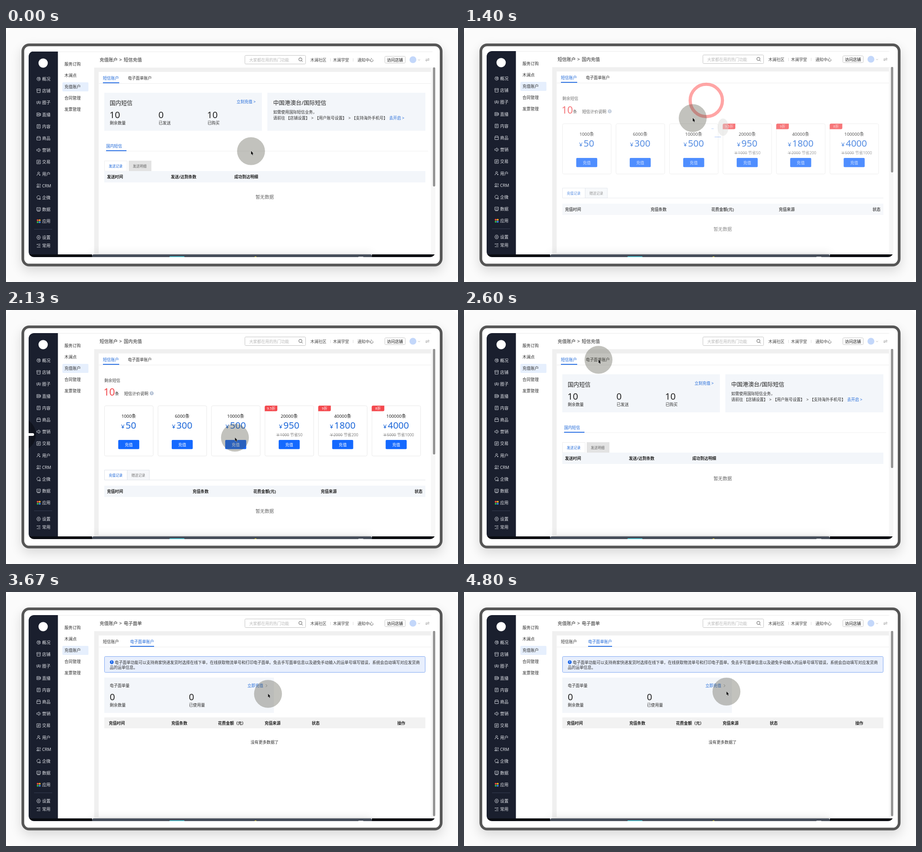
An HTML page with a canvas for the animation above (4.87 s loop, 998 by 561 pixels).

```html
<!DOCTYPE html>
<html lang="zh-CN">
<head>
<meta charset="utf-8">
<style>
html, body { margin: 0; width: 100%; height: 100%; overflow: hidden; background: #fff; }
canvas { display: block; width: 998px; height: 561px; }
</style>
</head>
<body>
<canvas id="stage" width="998" height="561"></canvas>
<script>
const c = document.getElementById('stage').getContext('2d');
const LOOP = 4870, STEP = 1000 / 15;
const FONT = '"Noto Sans", "Noto Sans CJK SC", "Noto Sans CJK", sans-serif';
const BLUE = '#1b66d8', INK = '#2e2e2e', PALE = '#f3f6fa';

const clamp = v => Math.max(0, Math.min(1, v));
const progress = (t, from, to) => clamp((t - from) / (to - from));
const smooth = p => p * p * (3 - 2 * p);

function text(s, x, y, size = 8.75, color = INK, weight = 400, align = 'left') {
  c.font = `${weight} ${size}px ${FONT}`;
  c.fillStyle = color;
  c.textAlign = align;
  c.fillText(s, x, y + size * 0.37);
}

function box(x, y, x2, y2, fill, border, r = 0) {
  c.beginPath();
  c.roundRect(x, y, x2 - x, y2 - y, r);
  if (fill) { c.fillStyle = fill; c.fill(); }
  if (border) { c.strokeStyle = border; c.lineWidth = 1; c.stroke(); }
}

function dot(x, y, r, fill) {
  c.beginPath();
  c.arc(x, y, r, 0, 7);
  c.fillStyle = fill;
  c.fill();
}

function icon(path, x, y, color, width = 0.9) {
  c.save();
  c.translate(x, y);
  c.strokeStyle = color;
  c.lineWidth = width;
  c.stroke(new Path2D(path));
  c.restore();
}

const row = (items, y, size, color, weight) =>
  items.forEach(([s, x]) => text(s, x, y, size, color, weight));

const MENU = [
  ['概况', 'M-1-4A4 4 0 1 0 4 1H-1ZM1-4A4 4 0 0 1 4-1H1Z'],
  ['店铺', 'M-4-4H4V-1H-4ZM-3.5-1V4H3.5V-1'],
  ['圈子', 'M-1.5-2a1.5 1.5 0 1 0 3 0a1.5 1.5 0 1 0-3 0M-2.5 3.5a2.5 3 0 0 1 5 0M-3-3A1.5 1.5 0 0 0-3 0L-4.5 2.5M3-3A1.5 1.5 0 0 1 3 0L4.5 2.5'],
  ['直播', 'M-4-3.5H2V3.5H-4ZM2-1L4.5-2.5V2.5L2 1M-2-1.5L.5 0L-2 1.5Z'],
  ['内容', 'M-3.5-4H3.5V4H-3.5ZM-1.5-2H1.5M-1.5 0H1.5M-1.5 2H.5'],
  ['商品', 'M-3-4H3L4-1V4H-4V-1ZM-4-1H4'],
  ['营销', 'M-4-1.5H-2L1-4V4L-2 1.5H-4ZM3-2.5A4 4 0 0 1 3 2.5'],
  ['交易', 'M-4-4H4V4H-4ZM-2-1H2L.5-2.5M2 1H-2L-.5 2.5'],
  ['用户', 'M-2-2a2 2 0 1 0 4 0a2 2 0 1 0-4 0M-4 4A4 4 0 0 1 0 .5M1 2.5H4M2.5 1V4'],
  ['CRM', 'M-3.5-2a2 2 0 1 0 4 0a2 2 0 1 0-4 0M-4 3.5V2H1V3.5ZM2-4A2 2 0 0 1 2 0M3 1.5L4 3.5H2.5'],
  ['企微', 'M1 3A3.7 3.7 0 1 1 3.5 0M-2 3V4.5M1 1.5H4V4H1Z'],
  ['数据', 'M-4-4H4V2.5H-4ZM-3 4H3M-2.5 0L-.5-1.5L1 0L3-2'],
  ['应用', ''],
  ['设置', 'M-2-4H2L4.3 0L2 4H-2L-4.3 0ZM-1.5 0a1.5 1.5 0 1 0 3 0a1.5 1.5 0 1 0-3 0'],
  ['常用', 'M-1-3H4M-1 0H4M-4 3.5H4M-4-1.5L-2.8-3.5L-1.8-1.5']
];

function sidebar() {
  box(50, 51, 114.6, 501, '#1a1f2e');
  dot(82, 76.5, 10.3, '#fff');
  MENU.forEach(([label, path], i) => {
    const y = i < 13 ? 111.5 + i * 26.2 : 461.5 + (i - 13) * 18;
    text(label, 79.7, y, 9.2, '#e4e6eb');
    icon(path, 72, y, '#d5d8df');
  });
  ['#f04b43', '#f9b51c', '#35b34a', '#3b82f6'].forEach((color, i) =>
    dot(70 + (i % 2) * 4.4, 423.5 + (i >> 1) * 4.4, 2.1, color));
  box(62, 443, 102, 444, '#343b50');
  box(124.5, 119, 182, 139, '#e6effd', null, 2);
  ['服务订购', '木澜点', '充值账户', '合同管理', '发票管理'].forEach((s, i) =>
    text(s, 129, 79 + i * 25, 9));
}

function header(page) {
  row([[page.crumb[0], 206.7], ['>', 250], [page.crumb[1], 260]], 69.5, 10, '#222', 500);
  box(527.5, 59.5, 661.5, 78.5, '#fff', '#c4c4c4', 2);
  text('大家都在用的热门功能', 537, 69.5, 8.8, '#b9b9b9');
  icon('M-4-.7a3.5 3.5 0 1 0 7 0a3.5 3.5 0 1 0-7 0M2 2L4.5 4.5', 650.5, 69, '#555', 1);
  row([['木澜社区', 672], ['木澜学堂', 722], ['通知中心', 776]], 69.5, 8.9, '#444');
  box(716, 66, 716.7, 73, '#ccc');
  box(766, 66, 766.7, 73, '#ccc');
  box(836.5, 61.5, 881.5, 76.5, '#fff', '#c8c8c8', 2);
  text('访问店铺', 841, 69.5, 8.9, '#111', 500);
  dot(898.5, 69, 7.6, '#c3d7fa');
  icon('M-2-1L0 1L2-1', 912, 69.5, '#aaa');
  icon('M-4-1H4L1.5-3.5M4 1.5H-4L-1.5 4', 930.5, 69, '#888', 0.8);

  box(194.6, 86.6, 948, 500, '#f0f0f0');
  box(204.6, 96, 938, 497, '#fff');
  box(205, 121, 938, 122, '#ededed');
  box(938, 87, 948, 500, '#f7f7f7');
  box(942.7, 86, 947.7, page.thumb, '#929292', null, 2);
  const bill = page === PAGES.bill;
  text('短信账户', 214, 109.5, 8.85, bill ? INK : BLUE, bill ? 400 : 500);
  text('电子面单账户', bill ? 274 : 269, 109.5, 8.8, bill ? BLUE : INK, bill ? 500 : 400);
  box(bill ? 274 : 214, 119, bill ? 327 : 250, 121, '#2f74e6');
}

function smsPage() {
  box(217, 142, 565, 226, PALE);
  box(577, 142, 926, 226, PALE);
  text('国内短信', 229, 164, 12.6, '#222');
  text('立刻充值 >', 509, 161.5, 8.75, BLUE);
  row([['10', 228.5], ['0', 336.5], ['10', 444]], 190.3, 20.4, '#222');
  row([['剩余数量', 229], ['已发送', 337], ['已购买', 445]], 208.5, 8.9);
  text('中国港澳台/国际短信', 590, 164, 12.5, '#222');
  text('如需使用国际短信业务，', 590, 184.5);
  row([['请前往', 590], ['【店铺设置】', 618], ['>', 674], ['【用户账号设置】', 682],
    ['>', 756], ['【支持海外手机号】', 763.5]], 197.5);
  text('去开启 >', 846, 197.5, 8.75, BLUE);

  text('国内短信', 221, 259.5, 8.8, BLUE, 500);
  box(217, 270.5, 932, 271.3, '#ececec');
  box(221, 269, 266, 271, '#2f74e6');
  box(217.5, 292.5, 267.5, 315, '#fff', '#ededed');
  box(271, 292, 321, 315, '#e3e3e3');
  text('发送记录', 227, 304.5, 7.6, BLUE);
  text('发送明细', 280, 304.5, 7.6, '#666');
  box(217, 315, 926, 340, PALE);
  row([['发送时间', 223], ['发送/达到条数', 364], ['成功到达明细', 504]], 328, 8.8, '#222', 700);
  text('暂无数据', 551, 372, 10.1, '#666');
}

const OFFERS = [[1000, 50], [6000, 300], [10000, 500], [20000, 950, 1000, '9.5折'],
  [40000, 1800, 2000, '9折'], [100000, 4000, 5000, '8折']];

function offerCard([count, price, full, tag], i) {
  const x = 217.5 + i * 118.1, mid = x + 53.5;
  box(x, 211.5, x + 107.5, 322.5, '#fff', '#e9e9e9', 3);
  text(count + '条', mid, 234, 9.8, '#222', 400, 'center');
  const digits = String(price).length * 11.7, left = mid - 3.5 - digits / 2;
  text('¥', left - 1.5, 256.8, 13, BLUE);
  text(price, left + 8.3, 254.5, 20.5, BLUE);
  if (full) {
    text('￥' + full, mid - 29, 276, 8.7, '#8c8c8c');
    box(mid - 29, 276, mid, 276.8, '#8c8c8c');
    text('节省' + (full - price), mid + 2, 276, 8.7, '#808080');
    box(x - 0.5, 211.2, x + 27.3, 223.4, '#f4484d', null, [3, 0, 3, 0]);
    text(tag, x + 13.5, 217.2, 7.8, '#fff', 400, 'center');
  }
  box(mid - 23.2, 287, mid + 23.2, 307.3, '#1469ff', null, 2);
  text('充值', mid, 297.5, 8.9, '#fff', 400, 'center');
}

function rechargePage() {
  text('剩余短信', 217, 155.5, 8.9, '#444');
  text('10', 215.5, 180.5, 22, '#f04448');
  text('条', 240.5, 184.5, 9);
  text('短信计价说明', 261, 184.5, 8.9, INK);
  dot(321.7, 184, 4.4, '#b6c3d6');
  text('i', 321.7, 184, 6.5, '#fff', 700, 'center');
  OFFERS.forEach(offerCard);
  box(217.5, 353.5, 267.5, 375.5, '#fff', '#dfe3ea');
  box(267.5, 353.5, 316.5, 375.5, '#f5f7fa', '#dfe3ea');
  box(267, 375, 926, 376, '#e2e5ea');
  text('充值记录', 227, 365, 7.6, BLUE);
  text('赠送记录', 277, 365, 7.6, '#777');
  box(217, 388, 926, 413, PALE);
  row([['充值时间', 223], ['充值条数', 412], ['花费金额(元)', 546], ['充值来源', 695], ['状态', 902]],
    400.5, 8.8, '#222', 700);
  text('暂无数据', 551, 444.5, 10.1, '#666');
}

function billPage() {
  box(217.5, 142.5, 925.5, 177.5, '#e8effd', '#7fa8f2', 2);
  dot(233.5, 155, 4.2, '#1b66e8');
  text('!', 233.5, 155, 6.5, '#fff', 700, 'center');
  text('电子面单功能可以支持商家快递发货时选择在线下单，在线获取物流单号和打印电子面单。' +
    '免去手写面单信息以及避免手动输入的运单号填写错误，系统会自动填写对应发货商', 240, 155.5);
  text('品的运单信息。', 229, 167);
  box(217, 189, 591.5, 267, PALE);
  text('电子面单量', 229, 207);
  text('立即充值', 533, 207, 8.75, BLUE);
  icon('M-1.5-3L1.5 0L-1.5 3', 575, 207, '#888');
  row([['0', 229], ['0', 403.7]], 231.3, 20.4, '#222');
  row([['剩余数量', 229], ['已使用量', 404]], 249.5, 8.9);
  box(217, 277, 926, 301, '#f2f2f2');
  row([['充值时间', 227], ['充值条数', 365], ['花费金额（元）', 468], ['充值来源', 571], ['状态', 675], ['操作', 864]],
    289.5, 8.8, '#222', 700);
  text('没有更多数据了', 540, 332, 8.85);
}

const PAGES = {
  sms: { draw: smsPage, crumb: ['充值账户', '短信充值'], thumb: 349 },
  recharge: { draw: rechargePage, crumb: ['短信账户', '国内充值'], thumb: 319, loader: 219 },
  bill: { draw: billPage, crumb: ['充值账户', '电子面单'], thumb: 495, loader: 237 }
};

// [shown at, page, fade-in start, fade-in end]
const VISITS = [[0, 'sms', -2, -1], [1130, 'recharge', 1250, 1450],
  [2260, 'sms', 2260, 2420], [2730, 'bill', 3060, 3290]];

// [time, x, y]
const MOVES = [[0, 541, 272], [333, 541, 272], [800, 539.5, 150.5], [930, 539.5, 150.5],
  [1150, 535, 160], [1220, 535, 160], [1400, 505, 199], [1780, 505.5, 282], [2200, 505.5, 282],
  [2590, 297, 110], [2760, 297, 110], [3067, 584.5, 225], [3530, 578.5, 225],
  [4130, 578.5, 225], [4800, 579.5, 220], [LOOP, 579.5, 220]];

function pointerAt(t) {
  const i = Math.max(1, MOVES.findIndex(m => m[0] >= t));
  const [t0, x0, y0] = MOVES[i - 1], [t1, x1, y1] = MOVES[i];
  const p = smooth(progress(t, t0, t1));
  return [x0 + (x1 - x0) * p, y0 + (y1 - y0) * p];
}

function loader(y, t) {
  c.beginPath();
  c.ellipse(572, y, 12, 19, 0, 0, 7);
  c.fillStyle = '#d9d9d6';
  c.fill();
  const shift = (t / 12) % 12;
  box(562 - shift, y + 21, 576 - shift, y + 22.3, '#5b93f3');
  box(555 - shift, y + 3, 560 - shift, y + 4, '#5b93f3');
}

function clickRing(t, start, x, y) {
  const p = (t - start) / 270;
  if (p < 0 || p >= 1) return;
  c.beginPath();
  c.arc(x, y, 38.2 * (1 - (1 - p) ** 2), 0, 7);
  c.strokeStyle = 'rgba(255,100,100,.58)';
  c.lineWidth = 7;
  c.stroke();
}

function backSwipe(t) {
  const p = (t - 2000) / 267;
  if (p <= 0 || p >= 1) return;
  const push = 14 * Math.sin(Math.PI * p);
  dot(15 + push, 275, 37, 'rgba(8,10,16,.55)');
  box(30 + push, 272, 48 + push, 278, '#fff', null, 3);
}

function pointer(x, y) {
  dot(x, y, 30.8, 'rgba(80,80,66,.35)');
  c.save();
  c.translate(x, y - 0.5);
  const arrow = new Path2D('M0 0V8L1.8 6.4L3.2 9.5L4.6 8.8L3.3 5.9H5.6Z');
  c.lineWidth = 1;
  c.strokeStyle = 'rgba(255,255,255,.8)';
  c.stroke(arrow);
  c.fillStyle = '#111';
  c.fill(arrow);
  c.restore();
}

function device() {
  box(0, 0, 998, 561, '#fff');
  box(0, 0, 998, 561, '#fbfbfb', null, 18);
  c.save();
  c.shadowColor = 'rgba(0,0,0,.14)';
  c.shadowBlur = 26;
  c.shadowOffsetY = 10;
  box(34.2, 34.2, 963.8, 526.6, '#555', null, 17);
  c.restore();
  box(40.2, 40.2, 957.8, 520.6, '#fff', null, 11);
}

function dock() {
  c.save();
  c.shadowColor = 'rgba(0,0,0,.18)';
  c.shadowBlur = 20;
  box(190, 500, 808, 507, '#474e5a', null, [4, 4, 0, 0]);
  c.restore();
  box(50, 500, 190, 507, '#0a0c12');
  box(808, 500, 948, 507, '#0a0c12');
  box(361, 504.5, 394, 507, '#4fd8e6', null, 2);
  dot(551, 507, 2.4, '#d9c73b');
  box(778, 505, 789, 507, '#d8dade', null, 1);
}

function draw(t) {
  device();
  c.save();
  c.beginPath();
  c.roundRect(50, 51, 898, 455, 12);
  c.clip();
  c.save();
  c.translate(0, 1 - progress(t, 0, 130));
  box(50, 51, 948, 501, '#fff');
  box(115, 51, 948, 51.7, '#e4e4e4');
  sidebar();
  const [, name, from, to] = VISITS.findLast(v => t >= v[0]);
  const page = PAGES[name], shown = progress(t, from, to);
  header(page);
  c.globalAlpha = shown;
  page.draw();
  if (page.loader) {
    c.globalAlpha = 1 - shown * shown;
    loader(page.loader, t);
  }
  c.restore();

  dock();
  if (t > 2870 && t < 3500) {
    box(50, 487.5, 348.5, 500, '#d3d6da', '#b4b8bd', [0, 3, 0, 0]);
    text('正在等待 plumv.test 的响应...', 53, 494, 7.5, '#222');
  }
  backSwipe(t);
  clickRing(t, 1200, 535, 160);
  clickRing(t, 2650, 297, 110);
  pointer(...pointerAt(t));
  c.restore();
}

function tick() {
  const t = performance.now() % LOOP;
  draw(Math.floor((t + 4) / STEP) * STEP);
  requestAnimationFrame(tick);
}
tick();
</script>
</body>
</html>
```
